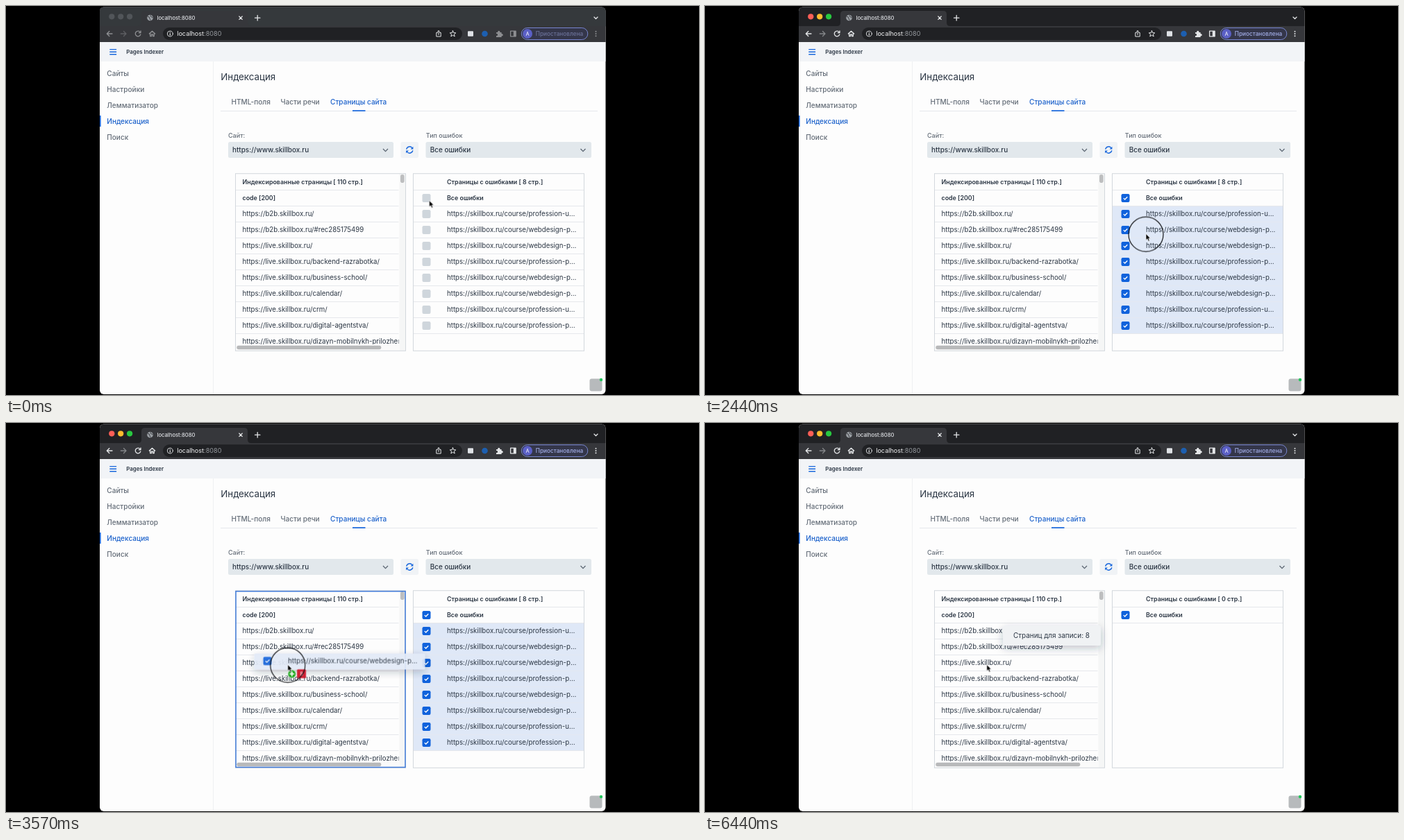
Animation of 998x561 px, one loop 6470 ms. Source, as an HTML page:

```html
<!DOCTYPE html>
<html lang="ru">
<head>
<meta charset="utf-8">
<title>Индексация</title>
<style>
  html, body { margin: 0; width: 100%; height: 100%; overflow: hidden; background: #000; }
  svg { display: block; width: 998px; height: 561px; font: 400 9.7px Inter, "Open Sans", sans-serif; }
  text { fill: #2b3644; white-space: pre; }
  .nav text, .tabs text { font-size: 10.07px; font-weight: 500; fill: #636c77; }
  .nav .on, .tabs .on { fill: #1b61cb; }
  .label { font-size: 9px; font-weight: 500; fill: #636c77; }
  .value { font-size: 9.93px; font-weight: 500; }
  .head { font-size: 8.88px; font-weight: 600; }
  .line { fill: none; stroke: #e6e8ec; }
  .frame { fill: none; stroke: #d3d8dd; }
  .icon { fill: none; stroke: #e4e6e8; stroke-width: 1.3; stroke-linecap: round; stroke-linejoin: round; }
  .blue { fill: none; stroke: #1766dc; stroke-width: 1.4; }

  .anim, .step { animation: 6470ms linear infinite both; }
  .step { animation-timing-function: step-end; }
  .inactive { animation-name: inactive; }
  .active { animation-name: active; }
  .dim { animation-name: dim; }
  .unchecked { animation-name: unchecked; }
  .checked { animation-name: checked; }
  .rows { animation-name: rows; }
  .marks { animation-name: marks; }
  .cleared { animation-name: cleared; }
  .over { animation-name: over; }
  .press { animation-name: press; }
  .drag { animation-name: drag; }
  .lag { animation-name: lag; }
  .toast { animation-name: toast; }
  .pointer { animation-name: pointer; }

  @keyframes inactive { 0% { opacity: 1 } 10.5%, 100% { opacity: 0 } }
  @keyframes active { 0% { opacity: 0 } 10.5%, 100% { opacity: 1 } }
  @keyframes dim { 0% { opacity: .5 } 10.5%, 100% { opacity: 1 } }
  @keyframes unchecked { 0% { opacity: 1 } 10.9%, 100% { opacity: 0 } }
  @keyframes checked { 0% { opacity: 0 } 10.9%, 100% { opacity: 1 } }
  @keyframes rows { 0% { opacity: 1 } 65.9%, 100% { opacity: 0 } }
  @keyframes marks { 0% { opacity: 0 } 10.9% { opacity: 1 } 65.9%, 100% { opacity: 0 } }
  @keyframes cleared { 0% { opacity: 0 } 65.9%, 100% { opacity: 1 } }
  @keyframes over { 0% { opacity: 0 } 43.6% { opacity: 1 } 57.6%, 100% { opacity: 0 } }
  @keyframes press {
    0% { opacity: 0 } 10% { opacity: 1 } 12% { opacity: 0 }
    37% { opacity: 1 } 57.6%, 100% { opacity: 0 }
  }
  @keyframes drag { 0% { opacity: 0 } 39% { opacity: 1 } 57.6%, 100% { opacity: 0 } }
  @keyframes lag { 0%, 39% { transform: none } 44.8% { transform: translateX(5.7px) } 54%, 100% { transform: none } }
  @keyframes toast { 0%, 65.9% { opacity: 0 } 70.5%, 100% { opacity: 1 } }
  @keyframes pointer {
    0%, 4% { transform: translate(609.5px, 280.5px); animation-timing-function: ease-in-out }
    9.5%, 28% { transform: translate(606.7px, 275.5px); animation-timing-function: ease-in-out }
    34%, 39% { transform: translate(635px, 328.5px); animation-timing-function: ease-in }
    44.82% { transform: translate(560px, 297px); animation-timing-function: ease-out }
    54%, 100% { transform: translate(405.7px, 348.5px) }
  }
</style>
</head>
<body>
<svg viewBox="0 0 998 561">
  <defs>
    <clipPath id="window"><rect x="135" y="1.5" width="728.5" height="558.5" rx="6"/></clipPath>
    <clipPath id="list"><rect x="331" y="242" width="234.5" height="246"/></clipPath>
    <filter id="shadow" x="-30%" y="-80%" width="160%" height="300%">
      <feDropShadow dx="0" dy="4" stdDeviation="6" flood-color="#1c2f4a" flood-opacity=".26"/>
    </filter>
    <rect id="box" x="-6" y="-6" width="12" height="12" rx="2.2" fill="#cfd6dc"/>
    <g id="tick">
      <rect x="-6" y="-6" width="12" height="12" rx="2.2" fill="#1062dc"/>
      <path d="M-2.8.1-.8 2 2.8-1.8" fill="none" stroke="#fff" stroke-width="1.3"/>
    </g>
    <path id="chevron" d="M-3.5-1.8 0 1.8 3.5-1.8" fill="none" stroke="#5b6672" stroke-width="1.3"/>
  </defs>

  <rect width="998" height="561"/>
  <g clip-path="url(#window)">
    <rect x="135" y="1" width="729" height="560" fill="#fdfdfd"/>

    <!-- Browser bars -->
    <rect x="135" y="1" width="729" height="28" fill="#202124"/>
    <rect class="step inactive" x="135" y="1" width="729" height="28" fill="#35393c"/>
    <path d="M190 29q5 0 5-5V12q0-5 5-5H343q5 0 5 5V24q0 5 5 5H864V52H135V29Z" fill="#36373b"/>
    <g class="step inactive" fill="#515559">
      <circle cx="152.3" cy="15.3" r="4.1"/><circle cx="165.2" cy="15.3" r="4.1"/><circle cx="178.1" cy="15.3" r="4.1"/>
    </g>
    <g class="step active">
      <circle cx="152.3" cy="15.3" r="4.1" fill="#fe5f57"/>
      <circle cx="165.2" cy="15.3" r="4.1" fill="#febc2e"/>
      <circle cx="178.1" cy="15.3" r="4.1" fill="#28c840"/>
    </g>
    <circle cx="207.5" cy="17" r="4.3" fill="#9ba0a5"/>
    <path d="M204 15.2q3 .3 2.8 2.3t2 3M208.3 13.3q-.8 2 1 2.2t1.7 1.7" fill="none" stroke="#36373b"/>
    <text x="217.5" y="19.8" style="font-size:7.65px;font-weight:500;fill:#dfe1e5">localhost:8080</text>
    <path class="icon" d="m335.8 15 4.4 4.4m0-4.4-4.4 4.4M358.5 17.2h7.4m-3.7-3.7v7.4M847 16l2.5 2.5L852 16"/>

    <g class="step dim">
      <path class="icon" d="M153 40h-7.6m3.4-3.5L145.3 40l3.5 3.5"/>
      <path class="icon" d="M165.3 40h7.6m-3.4-3.5 3.5 3.5-3.5 3.5" stroke-opacity=".45"/>
      <path class="icon" d="M193.2 37.8a3.8 3.8 0 1 0 .6 3M194 36v2.6h-2.7"/>
      <path class="icon" d="m206.3 40 4.2-3.8 4.2 3.8m-7-1v4.6h1.8v-2.7h2v2.7h1.8V39"/>
    </g>
    <rect x="226" y="31" width="431" height="18" rx="9" fill="#202124"/>
    <circle class="icon" cx="236.3" cy="40" r="4" style="stroke-width:.9"/>
    <path class="icon" d="M236.3 39.8v2.2m0-4v.1"/>
    <text x="246.2" y="43.3" style="font-size:9.1px;fill:#f2f3f4">localhost<tspan fill="#969a9f">:8080</tspan></text>
    <path class="icon" style="stroke-width:1" d="M621.2 38.5h-1.4V44h6.4v-5.5h-1.4M623 41.5v-5.8m-1.8 1.7 1.8-1.8 1.8 1.8"/>
    <path class="icon" style="stroke-width:1" d="m643.5 35.7 1.2 2.9 3.1.2-2.4 2 .8 3.1-2.7-1.7-2.7 1.7.8-3.1-2.4-2 3.1-.2Z"/>
    <rect x="665" y="36.2" width="8" height="7.6" rx="1" fill="#dfe2e6"/>
    <circle cx="689.5" cy="40" r="4.3" fill="#1d5fb0"/>
    <g class="step dim">
      <path d="M706 38h2.2a1.7 1.7 0 1 1 3.2 0h2.2v2.2a1.6 1.6 0 1 1 0 3V45H706v-2.2a1.5 1.5 0 1 0 0-2.8Z" fill="#e4e6e8"/>
      <path class="icon" d="M726.6 36.2h7.5v7.6h-7.5Z"/>
      <path d="M730.8 36h3.5v8h-3.5Z" fill="#e4e6e8"/>
      <g fill="#e4e6e8"><circle cx="849.5" cy="36.8" r="1"/><circle cx="849.5" cy="40" r="1"/><circle cx="849.5" cy="43.2" r="1"/></g>
    </g>
    <rect x="742.3" y="31.5" width="95.5" height="17" rx="8.5" fill="#34364a" stroke="#7785cf"/>
    <circle cx="751" cy="40" r="7" fill="#5b60c6"/>
    <text x="751" y="42.8" text-anchor="middle" style="font-size:7.5px;fill:#fff">А</text>
    <text class="step dim" x="762.8" y="43" style="font-size:8.25px;font-weight:500;fill:#a3aee8">Приостановлена</text>

    <!-- Page shell -->
    <rect x="135" y="52" width="729" height="28" fill="#f2f4f7"/>
    <path class="blue" d="M149.3 62.6h9.8m-9.8 3.6h9.8m-9.8 3.6h9.8"/>
    <text x="173.3" y="69" style="font-size:7.85px;font-weight:600">Pages Indexer</text>
    <path class="line" d="M298.5 80V560" stroke-opacity=".6"/>
    <g class="nav">
      <text x="145.3" y="100.6">Сайты</text>
      <text x="145.3" y="123.6">Настройки</text>
      <text x="145.3" y="146.6">Лемматизатор</text>
      <text x="145.3" y="169.6" class="on">Индексация</text>
      <text x="145.3" y="192.6">Поиск</text>
    </g>
    <rect x="135" y="158" width="1.6" height="16" fill="#1766dc"/>
    <text x="309.3" y="106.8" style="font-size:13.3px">Индексация</text>
    <path class="line" d="M309 151.5H852"/>
    <g class="tabs">
      <text x="324.4" y="141.6">HTML-поля</text>
      <text x="395.4" y="141.6">Части речи</text>
      <text x="467" y="141.6" class="on">Страницы сайта</text>
    </g>
    <rect x="499" y="150.2" width="18.5" height="1.7" fill="#1766dc"/>

    <text class="label" x="320" y="190">Сайт:</text>
    <text class="label" x="604.8" y="190">Тип ошибок</text>
    <rect x="320" y="196" width="238" height="23" rx="2.5" fill="#e2e8ec"/>
    <rect x="604.5" y="196" width="238.5" height="23" rx="2.5" fill="#e2e8ec"/>
    <rect x="568.5" y="196" width="25.5" height="23" rx="2.5" fill="#f0f3f6"/>
    <text class="value" x="326" y="211.2">https://www.skillbox.ru</text>
    <text class="value" x="610.8" y="211.2">Все ошибки</text>
    <use href="#chevron" x="546.5" y="207.8"/><use href="#chevron" x="831" y="207.8"/>
    <path class="blue" d="M576.7 206.6a4.6 4.6 0 0 1 8.2-1.9m.9 3.7a4.6 4.6 0 0 1-8.2 1.9"/>
    <path d="M586.4 202.7v3.8h-3.8ZM576.1 212.3v-3.8h3.8Z" fill="#1766dc"/>

    <!-- Indexed pages -->
    <g clip-path="url(#list)">
      <g id="indexed"></g>
      <text class="head" x="340.5" y="257">Индексированные страницы [ 110 стр.]</text>
      <text class="head" x="340.5" y="280">code [200]</text>
    </g>
    <rect x="566.5" y="242" width="9" height="255" fill="#f5f6f6"/>
    <rect x="331" y="488.5" width="236" height="8.5" fill="#fafafa"/>
    <rect x="568" y="243" width="5.6" height="12" rx="2.8" fill="#bdbebf"/>
    <rect x="332.3" y="489.8" width="208" height="5.4" rx="2.7" fill="#b8b9ba"/>
    <rect class="frame" x="330.5" y="241.7" width="245" height="255.6"/>
    <rect class="step over" x="331" y="242.7" width="244" height="253.8" fill="none" stroke="#3f79d8" stroke-width="1.5"/>

    <!-- Failed pages -->
    <g id="failed" class="step rows"></g>
    <g class="step unchecked"><use href="#box" x="605.5" y="277"/></g>
    <g class="step checked"><use href="#tick" x="605.5" y="277"/></g>
    <path class="line" d="M587 265.5H832M587 288.5H832"/>
    <text class="head step rows" x="635" y="257">Страницы с ошибками [ 8 стр.]</text>
    <text class="head step cleared" x="635" y="257">Страницы с ошибками [ 0 стр.]</text>
    <text class="head" x="635" y="280">Все ошибки</text>
    <rect class="frame" x="586.5" y="241.7" width="246" height="255.6"/>

    <rect x="840.5" y="537.5" width="18" height="18" rx="3" fill="#b7babc"/>
    <circle cx="857" cy="539" r="2.2" fill="#22c65b"/>

    <g class="anim toast">
      <rect x="429" y="292" width="141" height="29" rx="3.5" fill="#f0f2f4" filter="url(#shadow)"/>
      <text x="444" y="310.2" style="font-size:9.95px">Страниц для записи: 8</text>
    </g>

    <!-- Pointer with dragged row -->
    <g class="anim pointer">
      <g class="step drag">
        <g class="anim lag">
          <g opacity=".93">
            <rect x="-48.3" y="-16" width="246" height="23" rx="2" fill="#e2eaf7" filter="url(#shadow)"/>
            <use href="#tick" x="-29.3" y="-5.3" opacity=".95"/>
            <text x=".3" y="-1.9">https://skillbox.ru/course/webdesign-p…</text>
          </g>
          <rect x="13.3" y="6.8" width="13" height="12.6" rx="1.5" fill="#cf2034"/>
          <text x="19.8" y="15.8" text-anchor="middle" style="font-size:7.5px;fill:#fff">8</text>
        </g>
        <g class="step over">
          <circle cx="6" cy="13.4" r="5.8" fill="#22a822" stroke="#fff" stroke-width=".6"/>
          <path d="M2.7 13.4h6.6M6 10.1v6.6" stroke="#fff" stroke-width="1.7"/>
        </g>
      </g>
      <circle class="step press" cy=".7" r="25" fill="none" stroke="#15171a" stroke-width="1.2"/>
      <path d="M0 0V9.2L2.1 7.3 3.6 10.7 5.3 10 3.8 6.7H6.6Z" fill="#000" stroke="#fff" stroke-width=".7"/>
    </g>
  </g>
</svg>
<script>
  const indexed = ["b2b.skillbox.ru/", "b2b.skillbox.ru/#rec285175499",
    ...["", "backend-razrabotka/", "business-school/", "calendar/", "crm/",
      "digital-agentstva/", "dizayn-mobilnykh-prilozheniy/"].map(path => "live.skillbox.ru/" + path)];
  const failed = "profession-u webdesign-p webdesign-p profession-p webdesign-p webdesign-p profession-u profession-p".split(" ");

  const rowY = i => 300 + i * 23;
  const line = (x1, x2, y) => `<path class="line" d="M${x1} ${y}H${x2}"/>`;
  const label = (x, y, str) => `<text x="${x}" y="${y + 3.4}">https://${str}</text>`;

  document.getElementById("indexed").innerHTML =
    line(331, 566, 265.5) + line(331, 566, 288.5) +
    indexed.map((url, i) => label(340.5, rowY(i), url) + line(331, 566, rowY(i) + 11.5)).join("");

  document.getElementById("failed").innerHTML = failed.map((path, i) => {
    const y = rowY(i);
    return `<rect class="step marks" x="587" y="${y - 11.5}" width="245" height="23" fill="#dfe8f7"/>
      <g class="step unchecked"><use href="#box" x="605.5" y="${y}"/></g>
      <g class="step marks"><use href="#tick" x="605.5" y="${y}"/></g>` +
      line(587, 832, y + 11.5) + label(635, y, `skillbox.ru/course/${path}…`);
  }).join("");
</script>
</body>
</html>
```
